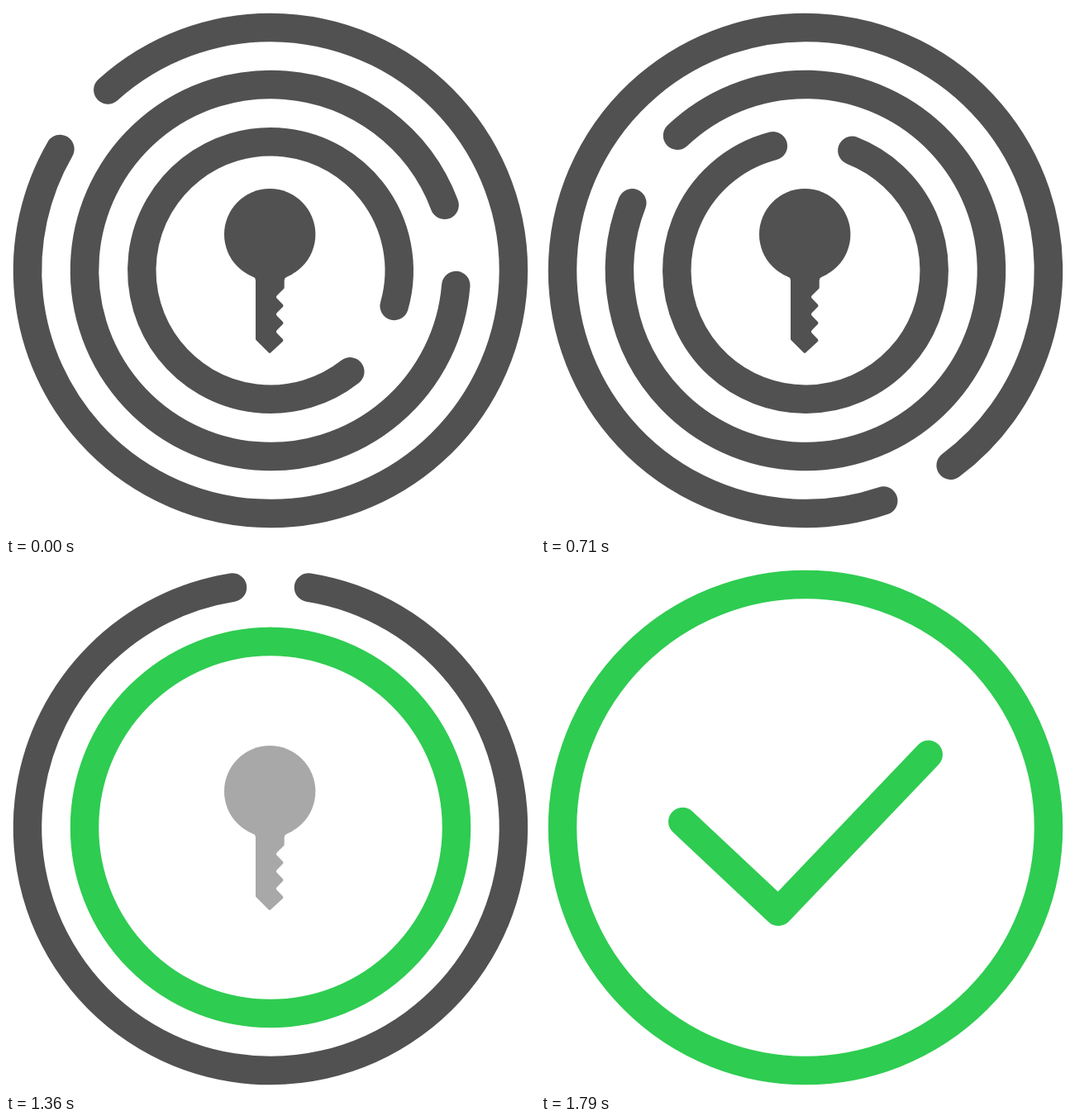
An HTML page with a canvas that plays this animation: 640 px wide and 640 px high, repeating every 2430 ms.

```html
<!DOCTYPE html>
<html>
<head>
<meta charset="utf-8">
<style>
html, body { margin: 0; overflow: hidden; background: #fff; }
canvas { display: block; }
</style>
</head>
<body>
<canvas id="stage" width="640" height="640"></canvas>
<script>
const ctx = document.getElementById('stage').getContext('2d');
const GRAY = '#515151', GREEN = '#2ecc51';
const LOOP = 2430, STEPS = 34;   // one loop is 34 equal ticks

// Angles in degrees, times in ticks; each ring is green from `green` until `gone`.
const rings = [
  { r: 155.7, gap: 17.9, from: 33.9, turn: -123.9, start: 2.56, length: 9.8, green: 16, gone: 18 },
  { r: 225, gap: 12.6, from: -8, turn: 278, start: 1.58, length: 14, green: 18, gone: 20 },
  { r: 294, gap: 9, from: 219, turn: -309, start: 1.57, length: 16.8, green: 20, gone: Infinity }
];
const tick = [[171.3, 313], [287.3, 421.8], [468.7, 231.8]];
const key = makeKey();

const clamp = x => Math.min(1, Math.max(0, x));
const rad = deg => deg * Math.PI / 180;
const ease = x => x < .5 ? (2 * x) ** 3.75 / 2 : 1 - (2 - 2 * x) ** 4 / 2;
const progress = (now, start, length) => ease(clamp((now - start) / length));

function makeKey() {
  const blade = [[302, 329], [302, 403.7], [319, 420.7], [336.2, 404.5]];
  for (let y = 394; y > 360; y -= 21) blade.push([326.2, y], [336.2, y - 10.5]);
  blade.push([326.2, 352], [336.7, 341.5], [336.7, 329], [347, 324]);
  const path = new Path2D();
  path.moveTo(319.2, 300);
  path.lineTo(292, 324);
  for (let i = 0; i < blade.length - 1; i++) {
    const neck = i === 0 || i === blade.length - 2;
    path.arcTo(...blade[i], ...blade[i + 1], neck ? 5 : 2);
  }
  path.lineTo(347, 324);
  path.closePath();
  const head = new Path2D();
  head.arc(319.2, 276.3, 55.2, 0, 7);
  return [path, head];
}

function drawRing(ring, now) {
  if (now >= ring.gone) return;
  const open = now < ring.green;
  const middle = ring.from + ring.turn * progress(now, ring.start, ring.length);
  const gap = open ? ring.gap : 0;
  ctx.strokeStyle = open ? GRAY : GREEN;
  ctx.beginPath();
  ctx.arc(320, 320, ring.r, rad(middle + gap), rad(middle + 360 - gap));
  ctx.stroke();
}

function drawKey(now) {
  // Solid blend with white, so the overlapping parts fade as one.
  const fade = clamp((now - 17.5) / 3);
  if (fade === 1) return;
  const level = Math.round(81 + 174 * fade);
  ctx.fillStyle = `rgb(${level},${level},${level})`;
  key.forEach(part => ctx.fill(part));
}

function drawTick(now) {
  const p = progress(now, 19.73, 5);
  if (!p) return;
  const lengths = [0, 1].map(i =>
    Math.hypot(tick[i + 1][0] - tick[i][0], tick[i + 1][1] - tick[i][1]));
  let left = p * (lengths[0] + lengths[1]);
  ctx.strokeStyle = GREEN;
  ctx.beginPath();
  ctx.moveTo(...tick[0]);
  for (let i = 0; i < 2 && left > 0; i++) {
    const part = Math.min(1, left / lengths[i]);
    ctx.lineTo(...tick[i].map((v, axis) => v + (tick[i + 1][axis] - v) * part));
    left -= lengths[i];
  }
  ctx.stroke();
}

function draw() {
  const now = Math.floor(performance.now() % LOOP / LOOP * STEPS + .09);
  ctx.clearRect(0, 0, 640, 640);
  ctx.lineWidth = 34.5;
  ctx.lineCap = ctx.lineJoin = 'round';
  rings.forEach(ring => drawRing(ring, now));
  drawKey(now);
  drawTick(now);
  requestAnimationFrame(draw);
}
draw();
</script>
</body>
</html>
```
